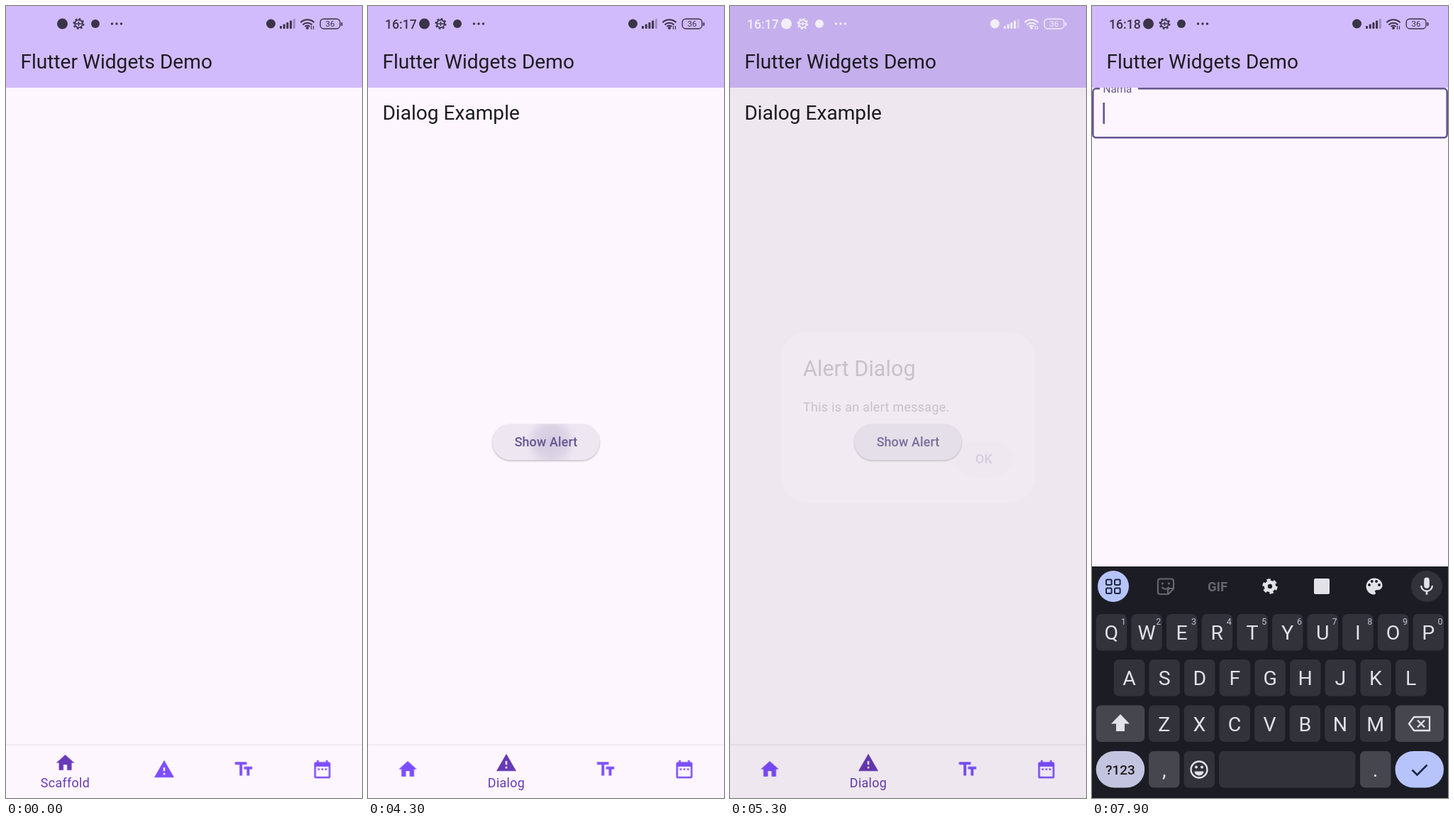
Recreate the animation shown at these times as an HTML page. Size 502 by 1115 pixels, loop 8000 ms.

```html
<!DOCTYPE html>
<html lang="en">
<head>
<meta charset="utf-8">
<title>Flutter Widgets Demo</title>
<style>
  html, body { margin: 0; width: 100%; height: 100%; overflow: hidden; background: #fef6ff; }
  svg { display: block; width: 100vw; height: 100vh; }
  text { font-family: Roboto, sans-serif; fill: #1d1b20; }
  .title { font-size: 28.1px; }
  .body { font-size: 17.9px; letter-spacing: .32px; }
  .count { font-size: 35.8px; }
  .action { font-size: 17.9px; font-weight: 500; letter-spacing: .13px; fill: #65558f; }
  .tab { font-size: 17.9px; letter-spacing: .32px; fill: #673ab7; }
  .mid { text-anchor: middle; }
  .line { fill: none; stroke: currentColor; }
  .clock { font-size: 17.6px; font-weight: 500; fill: currentColor; }
  .key { font-size: 28.5px; fill: #e3e2e9; text-anchor: middle; }
  .hint { font-size: 12.5px; fill: #c6c6d0; text-anchor: middle; }
</style>
</head>
<body>
<svg viewBox="0 0 502 1115">
  <defs>
    <radialGradient id="ink">
      <stop offset="0" stop-color="#65558f" stop-opacity=".2"/>
      <stop offset=".6" stop-color="#65558f" stop-opacity=".13"/>
      <stop offset="1" stop-color="#65558f" stop-opacity="0"/>
    </radialGradient>
    <clipPath id="pageClip"><rect y="115" width="502" height="1000"/></clipPath>
    <clipPath id="fabClip"><rect x="215" y="969" width="72" height="72" rx="20.4"/></clipPath>
    <clipPath id="alertClip"><rect x="175.5" y="588.5" width="151" height="51" rx="25.5"/></clipPath>
    <clipPath id="okClip"><rect x="317" y="613" width="82" height="50" rx="25"/></clipPath>
    <clipPath id="navClip"><rect y="1041" width="502" height="74"/></clipPath>
  </defs>

  <rect width="502" height="1115" fill="#fef6ff"/>
  <rect width="502" height="115" fill="#d2bbfd"/>
  <text class="title" x="20.4" y="88">Flutter Widgets Demo</text>

  <g id="counterPage">
    <text class="title" x="20.4" y="160">My Increment App</text>
    <text class="body mid" x="251" y="597">You have pushed the button this many times:</text>
    <g id="counts"></g>
    <rect x="215" y="969" width="72" height="72" rx="20.4" fill="#eaddff"
      style="filter:drop-shadow(0 4px 4px rgba(0,0,0,.32))"/>
    <g id="fabInk" clip-path="url(#fabClip)">
      <rect id="fabPress" x="215" y="969" width="72" height="72" fill="#21005d" fill-opacity=".13"/>
    </g>
    <path d="M242 1005.3h18M251 996.3v18" stroke="#21005d" stroke-width="2.5"/>
  </g>

  <g id="dialogPage">
    <text class="title" x="20.4" y="160">Dialog Example</text>
    <rect x="175.5" y="588.5" width="151" height="51" rx="25.5" fill="#f7f0fa"
      style="filter:drop-shadow(0 1.3px 1px rgba(0,0,0,.3))"/>
    <g id="alertInk" clip-path="url(#alertClip)">
      <rect id="alertFocus" x="175" y="588" width="152" height="52" fill="#65556f" fill-opacity=".055"/>
    </g>
    <text class="action mid" x="251" y="620">Show Alert</text>
  </g>

  <g id="formPage" clip-path="url(#pageClip)">
    <rect id="border" x="1.3" y="116.3" width="499.4" height="69" rx="4.5" fill="none"/>
    <rect id="notch" x="11" y="114" width="54" height="5" fill="#fef6ff"/>
    <text id="label" font-size="20.4">Nama</text>
    <rect id="cursor" x="15.4" y="136" width="2.6" height="30" fill="#65558f"/>
  </g>

  <g>
    <rect y="1041" width="502" height="80" fill="#fef6ff" style="filter:drop-shadow(0 -1px 1px rgba(0,0,0,.09))"/>
    <g id="navInk" clip-path="url(#navClip)"></g>
    <g id="nav"></g>
  </g>

  <g id="keyboard"></g>
  <rect id="scrim" width="502" height="1115"/>

  <g id="dialog">
    <rect x="72" y="459" width="358" height="240" rx="36" fill="#fef6ff"/>
    <text x="103" y="521" font-size="30.6">Alert Dialog</text>
    <text class="body" x="103" y="570.5">This is an alert message.</text>
    <g id="okInk" clip-path="url(#okClip)">
      <rect id="okPress" x="317" y="613" width="82" height="50" fill="#65558f" fill-opacity=".05"/>
    </g>
    <text class="action mid" x="358" y="644">OK</text>
  </g>

  <g id="status">
    <text id="timeA" class="clock" x="24" y="32">16:17</text>
    <text id="timeB" class="clock" x="24" y="32">16:18</text>
    <g fill="currentColor">
      <circle cx="79.5" cy="25" r="7.5"/>
      <circle cx="126" cy="25" r="6"/>
      <circle cx="149.5" cy="25" r="1.7"/><circle cx="156" cy="25" r="1.7"/><circle cx="162.5" cy="25" r="1.7"/>
      <circle cx="373.5" cy="25" r="6.5"/>
      <g id="bars"></g>
      <circle cx="425" cy="31" r="2"/>
      <rect x="472.5" y="23" width="2" height="5" rx="1"/>
    </g>
    <g class="line">
      <circle cx="102.5" cy="25" r="5.4" stroke-width="1.7"/>
      <circle cx="102.5" cy="25" r="7" stroke-width="2" stroke-dasharray="2.75"/>
      <path d="M98 25h9M102.5 22v6" stroke-width="1.5"/>
      <path d="M415.5 23.2a13.5 13.5 0 0 1 19 0M418.5 26.4a9.3 9.3 0 0 1 13 0M421.5 29a5 5 0 0 1 7 0" stroke-width="2.1"/>
      <path d="M430.5 28v5M433.5 28v5" stroke-width="1.2"/>
      <rect x="443.2" y="18.2" width="27.8" height="13.8" rx="4.8" stroke-width="1.4"/>
    </g>
    <text class="mid" x="457" y="29.3" font-size="11.5" style="fill:currentColor">36</text>
  </g>
</svg>

<script>
const LOOP = 8000;
const STANDARD = 'cubic-bezier(.4,0,.2,1)';
const $ = id => document.getElementById(id);

function animate(el, prop, steps) {
  const all = [[0, ...steps[0].slice(1)], ...steps, [LOOP, steps[steps.length - 1][1]]];
  el.animate(
    all.map(([t, value, easing = 'linear']) => ({ offset: t / LOOP, [prop]: value, easing })),
    { duration: LOOP, iterations: Infinity, easing: `steps(${LOOP / 100})` });
}

const show = (el, from, to = LOOP) =>
  animate(el, 'opacity', [[0, 0, 'step-end'], [from, 1, 'step-end'], [to, to < LOOP ? 0 : 1, 'step-end']]);

function add(parent, tag, attrs = {}, text = '') {
  const el = document.createElementNS('http://www.w3.org/2000/svg', tag);
  for (const name in attrs) el.setAttribute(name, attrs[name]);
  el.textContent = text;
  parent.append(el);
  return el;
}

function ripple(parent, cx, cy, start, length, r0, r1) {
  const el = add(parent, 'circle', { cx, cy, r: r0, fill: 'url(#ink)' });
  animate(el, 'r', [[start, `${r0}px`], [start + length, `${r1}px`]]);
  animate(el, 'opacity', [[start - 10, 0], [start - 5, 1], [start + length * .6, 1], [start + length, 0]]);
}

// Pages and status bar
show($('counterPage'), 0, 3450);
show($('dialogPage'), 3450, 6250);
show($('formPage'), 6250);
show($('timeA'), 0, 5950);
show($('timeB'), 5950);
animate($('status'), 'color', [[0, '#3b3348', 'step-end'], [4350, '#f3eff6', 'step-end'], [5350, '#3b3348', 'step-end']]);
for (let i = 0; i < 5; i++) {
  const height = 4 + i * 2.5;
  add($('bars'), 'rect', { x: 386 + i * 4.7, y: 32 - height, width: 3, height, rx: 1, opacity: i < 4 ? 1 : .35 });
}

// Counter
const taps = [400, 800, 1200, 1600, 2000];
const bounds = [0, ...taps.map(t => t + 150), LOOP];
for (let n = 0; n <= taps.length; n++) {
  show(add($('counts'), 'text', { class: 'count mid', x: 251, y: 640 }, n), bounds[n], bounds[n + 1]);
}
for (const t of taps) ripple($('fabInk'), 269, 1014, t, 350, 5, 70);
animate($('fabPress'), 'opacity', [[400, 0], [500, 1], [2150, 1], [2400, 0]]);

// Bottom navigation
const tabs = [
  ['Scaffold', 'M10 20v-6h4v6h5v-8h3L12 3 2 12h3v8z'],
  ['Dialog', 'M1 21h22L12 2zm12-3h-2v-2h2zm0-4h-2v-4h2z'],
  ['Text', 'M2.5 4v3h5v12h3V7h5V4zm19 5h-9v3h3v7h3v-7h3z'],
  ['Date', 'M9 11H7v2h2zm4 0h-2v2h2zm4 0h-2v2h2zm2-7h-1V2h-2v2H8V2H6v2H5a2 2 0 0 0-2 2v14a2 2 0 0 0 2 2h14a2 2 0 0 0 2-2V6a2 2 0 0 0-2-2zm0 16H5V9h14z']
];
const centers = [[83.5, 223, 335, 446], [56, 195, 335, 446], [56, 167, 307, 446]];
const stays = [[0, 3450], [3700, 6250], [6500, LOOP]];
tabs.forEach(([name, d], i) => {
  const perTab = value => stays.flatMap(([from, to], tab) => [[from, value(tab)], [to, value(tab), STANDARD]]);
  const item = add($('nav'), 'g');
  const icon = add(item, 'g', { fill: 'currentColor' });
  add(icon, 'path', { d, transform: 'translate(-15.3 -15.3) scale(1.277)', 'fill-rule': 'evenodd' });
  const label = add(item, 'text', { class: 'tab mid', y: 1099.5 }, name);
  animate(item, 'transform', perTab(tab => `translateX(${centers[tab][i]}px)`));
  animate(item, 'color', perTab(tab => tab === i ? '#673ab7' : '#7c4dff'));
  animate(icon, 'transform', perTab(tab => `translateY(${tab === i ? 1065.5 : 1074.5}px)`));
  animate(label, 'opacity', perTab(tab => tab === i ? 1 : 0));
});
ripple($('navInk'), 223, 1074, 3400, 350, 8, 60);
ripple($('navInk'), 335, 1074, 6200, 350, 8, 60);

// Alert dialog
ripple($('alertInk'), 258, 614, 4200, 250, 8, 78);
animate($('alertFocus'), 'opacity', [[4150, 0], [4250, 1], [5600, 1], [5700, 0]]);
ripple($('okInk'), 365, 650, 5000, 300, 6, 30);
animate($('okPress'), 'opacity', [[4900, 0], [5000, 1]]);
const fade = (el, peak, easing) =>
  animate(el, 'opacity', [[0, 0, 'step-end'], [4350, peak], [5167, peak, easing], [5317, 0]]);
fade($('scrim'), .54, 'cubic-bezier(.75,0,.75,.9)');
fade($('dialog'), 1, 'cubic-bezier(.42,0,1,1)');

// Text field
const focus = (id, prop, idle, active) =>
  animate($(id), prop, [[6850, idle, STANDARD], [7020, active]]);
focus('border', 'stroke', '#79747e', '#65558f');
focus('border', 'strokeWidth', '1.3px', '2.6px');
focus('notch', 'opacity', 0, 1);
focus('label', 'fill', '#49454f', '#65558f');
focus('label', 'transform', 'translate(15.5px,157.5px) scale(1)', 'translate(15.5px,121.5px) scale(.75)');
animate($('cursor'), 'opacity',
  [[0, 0, 'step-end'], [6950, 1, 'step-end'], [7390, 0, 'step-end'], [7850, 1, 'step-end']]);

// Keyboard
const board = $('keyboard');
const KEY = '#31323a', SIDE = '#46464f', BLUE = '#b6c4fb', LIGHT = '#e3e2e9', DIM = '#66666d';
const box = (x, y, width, fill, rx = 7) => add(board, 'rect', { x, y, width, height: 51.5, rx, fill });
const dot = (cx, cy, r, fill) => add(board, 'circle', { cx, cy, r, fill });
const path = (d, attrs) => add(board, 'path', { d, fill: 'none', ...attrs });
const stroke = (d, color, width) => path(d, { stroke: color, 'stroke-width': width });
const ring = (cx, cy, r, color, width, dash = 'none') => add(board, 'circle',
  { cx, cy, r, fill: 'none', stroke: color, 'stroke-width': width, 'stroke-dasharray': dash });

add(board, 'rect', { y: 789, width: 502, height: 330, fill: '#1c1d24' });
dot(30, 817, 22, BLUE);
for (const x of [20, 32]) for (const y of [807.5, 819.5]) {
  add(board, 'rect', { x, y, width: 7.6, height: 7.6, rx: 1.5, fill: 'none', stroke: '#1d2440', 'stroke-width': 2 });
}
stroke('M96 806.500h16a3 3 0 0 1 3 3v11l-7.500 7.500h-11.500a3 3 0 0 1-3-3v-15.500a3 3 0 0 1 3-3zM98.500 818q5 6 10 0M114 820h-4a3 3 0 0 0-3 3v5', DIM, 2.2);
dot(99.5, 813, 1.6, DIM);
dot(108.5, 813, 1.6, DIM);
add(board, 'text', { class: 'mid', x: 177, y: 823.5, 'font-size': 18.5, 'font-weight': 700, style: `fill:${DIM}` }, 'GIF');
ring(251, 817, 5.7, LIGHT, 5);
ring(251, 817, 9, LIGHT, 3.4, '5.2 4.225');
add(board, 'rect', { x: 313, y: 806, width: 22, height: 22, rx: 2, fill: LIGHT });
path('M12 3a9 9 0 0 0 0 18c.83 0 1.500-.67 1.500-1.500 0-.9-.77-1.200-.77-2 0-.83.67-1.500 1.500-1.500H16c2.760 0 5-2.240 5-5 0-4.420-4.030-8-9-8z',
  { fill: LIGHT, transform: 'translate(382.7 801.7) scale(1.277)' });
for (const [x, y] of [[391, 815], [394.7, 810], [401, 810], [405, 815]]) dot(x, y, 1.9, '#1c1d24');
dot(472, 817, 22, KEY);
path('M12 14a3 3 0 0 0 3-3V5a3 3 0 0 0-6 0v6a3 3 0 0 0 3 3zm5.300-3a5.300 5.100 0 0 1-10.600 0H5c0 3.410 2.720 6.230 6 6.720V21h2v-3.280c3.280-.48 6-3.300 6-6.720z',
  { fill: LIGHT, transform: 'translate(456.7 802) scale(1.277)' });

[['QWERTYUIOP', 5.7, 856], ['ASDFGHJKL', 30.8, 920], ['ZXCVBNM', 80, 984.5]].forEach(([letters, left, top], row) => {
  [...letters].forEach((letter, i) => {
    const x = left + i * 49.65;
    box(x, top, 43.5, KEY);
    add(board, 'text', { class: 'key', x: x + 21.7, y: top + 36 }, letter);
    if (row === 0) add(board, 'text', { class: 'hint', x: x + 38.5, y: top + 14.5 }, (i + 1) % 10);
  });
});
box(5.7, 984.5, 68.5, SIDE);
path('M40 997l13 13.500h-7v10.500h-12v-10.500h-7z', { fill: LIGHT });
box(427.5, 984.5, 68.5, SIDE);
stroke('M454 1001h22v19h-22l-7-9.500zM459 1005.500l10 10M469 1005.500l-10 10', LIGHT, 2.3);

box(5.7, 1049, 68.5, '#c3c4df', 25.7);
add(board, 'text', { class: 'mid', x: 40, y: 1082, 'font-size': 19, 'font-weight': 500 }, '?123');
box(80, 1049, 43.5, SIDE);
add(board, 'text', { class: 'key', x: 101.8, y: 1085 }, ',');
box(129.6, 1049, 43.5, KEY);
ring(151, 1075, 11.5, LIGHT, 2.3);
dot(147, 1071.5, 2, LIGHT);
dot(155, 1071.5, 2, LIGHT);
path('M144.500 1077.500h13a6.500 6 0 0 1-13 0z', { fill: LIGHT });
box(179, 1049, 192.5, KEY);
box(378, 1049, 43.5, SIDE);
add(board, 'text', { class: 'key', x: 399.5, y: 1085 }, '.');
box(427.5, 1049, 68.5, BLUE, 25.7);
stroke('M451.500 1075.500l7 7 14-14', '#1d2440', 2.6);

animate(board, 'transform', [
  [7050, 'translateY(326px)'],
  [7100, 'translateY(255px)', 'cubic-bezier(.2,.4,.3,1)'],
  [7450, 'translateY(0px)']
]);
</script>
</body>
</html>
```
